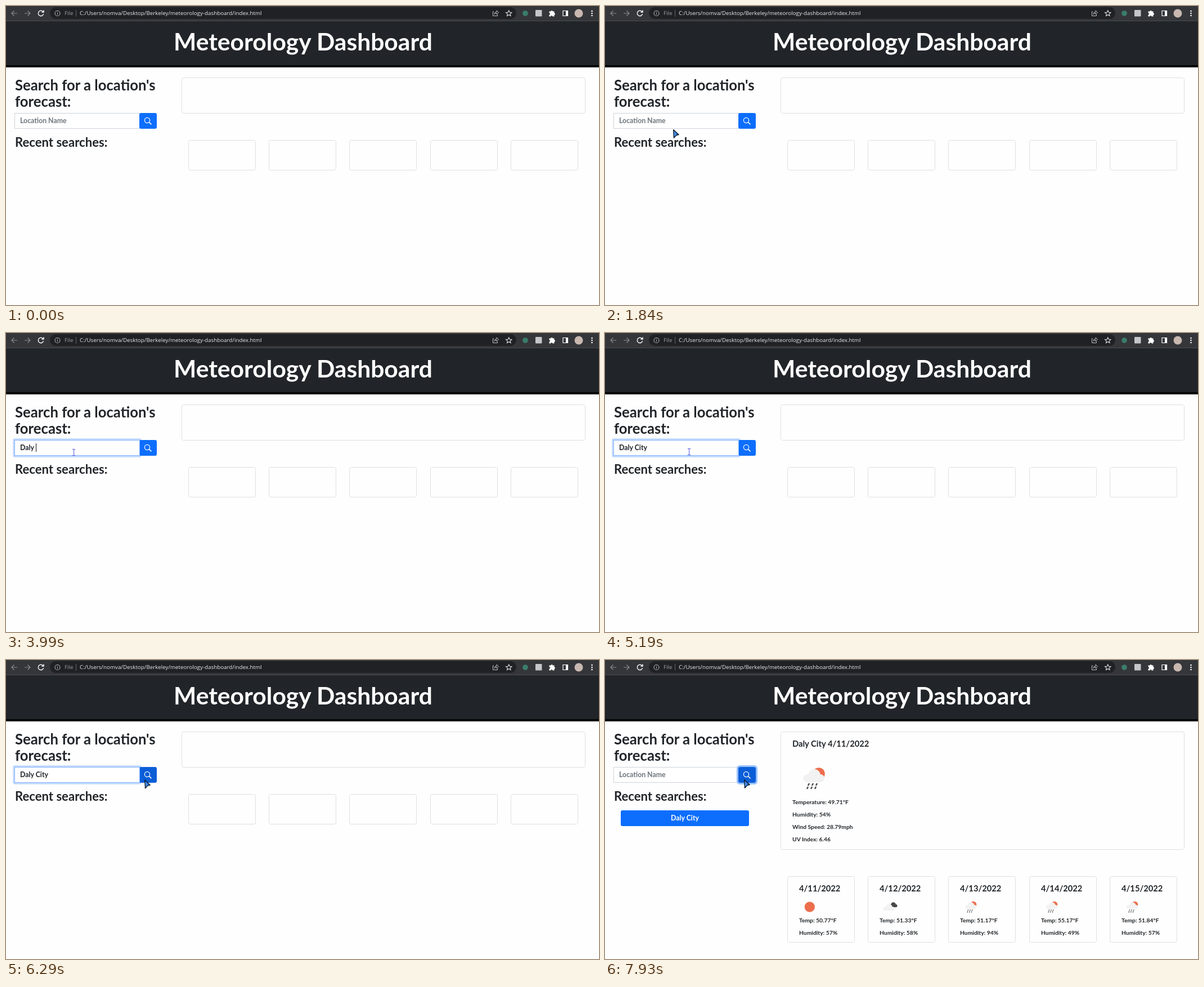
Recreate the animation shown at these times as an HTML page. Size 1054 by 531 pixels, loop 8 s.

```html
<!DOCTYPE html>
<html lang="en">
<head>
<meta charset="utf-8">
<title>Meteorology Dashboard</title>
<style>
html, body { margin: 0; width: 100%; height: 100%; overflow: hidden; background: #fefefe; }
svg { position: absolute; left: 0; top: 0; display: block; }
svg, #field { font-family: Lato, "Open Sans", sans-serif; font-weight: 700; }
text { fill: #212529; }
.title { font-size: 42.6px; fill: #fff; text-anchor: middle; }
.h2 { font-size: 25.7px; }
.h3 { font-size: 22.1px; }
.h5 { font-size: 14.7px; }
.input { font-size: 12.3px; }
.small { font-size: 10.3px; }
.url { font: 400 9.8px "Open Sans", "Noto Sans", sans-serif; fill: #e8eaed; }
.line { fill: none; stroke: #e0e1e3; stroke-width: 1.2; }
.card { fill: #fefefe; stroke: #dfdfdf; }

#field {
  position: absolute; left: 25px; top: 190px; height: 28px;
  line-height: 28px; font-size: 12.3px; color: #212529; white-space: pre;
}
#caret {
  display: inline-block; width: 1px; height: 15px; margin-left: .5px;
  vertical-align: -3px; background: #111;
}

/* One shared 8 s timeline */
.a { animation: 8s linear infinite; }
.step { animation-timing-function: step-end; }
#hint { animation-name: hint; }
#caret { animation-name: caret; }
#glow { animation-name: glow; }
#button { fill: #0d6efd; animation-name: hover; }
#ring { animation-name: ring; }
#recent { animation-name: recent; }
.result { animation-name: result; }
#main { animation-name: grow; }
#days { animation-name: drop; }
.day { animation-name: growDay; }
#cursor { animation-name: move; }
#arrow { animation-name: arrow; }
#beam { animation-name: beam; }

@keyframes hint { 0%, 80.625% { visibility: visible } 42.125% { visibility: hidden } 100% { visibility: visible } }
@keyframes caret {
  0%, 32.75%, 62.75%, 75.25%, 100% { opacity: 0 }
  26.5%, 39%, 69% { opacity: 1 }
}
@keyframes glow { 0%, 25.75%, 81.25%, 100% { opacity: 0 } 27.6%, 79.375% { opacity: 1 } }
@keyframes hover { 0%, 69.5% { fill: #0d6efd } 71.4%, 100% { fill: #0b5ed7 } }
@keyframes ring { 0%, 79.375% { opacity: 0 } 81.25%, 100% { opacity: 1 } }
@keyframes recent { 0% { visibility: hidden } 83.625%, 100% { visibility: visible } }
@keyframes result { 0% { visibility: hidden } 95%, 100% { visibility: visible } }
@keyframes grow { 0% { height: 63px } 95%, 100% { height: 209px } }
@keyframes growDay { 0% { height: 53px } 95%, 100% { height: 117px } }
@keyframes drop { 0% { transform: translateY(0) } 95%, 100% { transform: translateY(146px) } }
@keyframes move {
  0%, 10.75% { transform: translate(298px, 522px) }
  12% { transform: translate(249px, 459px) }
  13.375% { transform: translate(204px, 403px) }
  15.6% { transform: translate(160px, 308px) }
  18% { transform: translate(130px, 242px) }
  20.75%, 22% { transform: translate(121px, 223px) }
  23% { transform: translate(121px, 219px) }
  25%, 63.25% { transform: translate(120.5px, 212px) }
  67.5% { transform: translate(196px, 209px) }
  70.5% { transform: translate(239px, 211px) }
  72.25%, 73.5% { transform: translate(245px, 212px) }
  83%, 92.75% { transform: translate(247px, 213px) }
  99%, 100% { transform: translate(247px, 212px) }
}
@keyframes arrow {
  0%, 23.4% { visibility: hidden }
  10.75%, 69.9%, 100% { visibility: visible }
}
@keyframes beam { 0%, 69.9%, 100% { visibility: hidden } 23.4% { visibility: visible } }
</style>
</head>
<body>
<svg width="1054" height="531" viewBox="0 0 1054 531">
  <defs>
    <linearGradient id="blue" x2="1">
      <stop offset="0" stop-color="#58a6ff"/><stop offset="1" stop-color="#1456b8"/>
    </linearGradient>
    <g id="cloud">
      <circle cx="-12" cy="0" r="7"/><circle cx="1" cy="-5" r="11"/><circle cx="12" cy="0" r="7"/>
      <rect x="-12" y="-3" width="24" height="10"/>
    </g>
    <g id="rain">
      <circle cx="9" cy="-8" r="10.8" fill="#ec6e4c"/>
      <use href="#cloud" fill="#f2f2f2"/>
      <path d="M-8 9l-2 4M-1 9l-2 4M6 9l-2 4M-10 15l-2 4M-3 15l-2 4M4 15l-2 4" stroke="#48484a" stroke-width="2.4"/>
    </g>
    <g id="sun"><circle cx="-10" cy="0" r="17.6" fill="#ec6e4c"/></g>
    <g id="clouds">
      <use href="#cloud" fill="#48484a" transform="translate(10 -4) scale(.74)"/>
      <use href="#cloud" fill="#f2f2f2" transform="translate(-5 6)"/>
    </g>
  </defs>

  <!-- browser bar -->
  <rect width="1054" height="27" fill="#35363a"/>
  <rect x="78" y="2" width="829" height="21" rx="10.5" fill="#202124"/>
  <g class="line">
    <path d="M20 13H10m4.500-4.500L10 13l4.500 4.500M33 13h10m-4.500-4.500L43 13l-4.500 4.500" stroke="#8b8c8f"/>
    <path d="M66 10.500a4.700 4.700 0 1 0 .6 3.600M67 7.500v3.600h-3.600" stroke="#f1f3f4" stroke-width="1.500"/>
    <g stroke="#a4a8ad"><circle cx="91.500" cy="13" r="4.500"/><path d="M91.500 12.300v3M91.500 10.300v1"/></g>
    <path d="M124.500 7v12" stroke="#5f6368" stroke-width="1"/>
    <path d="M867 10h-1.500v7.500h8V15M868 14.500q.5-4 4-4V8l3.500 3.500-3.500 3.300v-2.300q-2.500 0-4 2z" stroke="#bdc1c6" stroke-width="1"/>
    <path d="M893.800 8l1.500 3.300 3.600.4-2.700 2.400.8 3.500-3.200-1.800-3.200 1.800.8-3.500-2.700-2.400 3.600-.4z" stroke="#d5d8dc"/>
    <path d="M990 8.500h8.500v9H990z" stroke="#fff"/>
  </g>
  <text class="url" x="104" y="16.300" style="fill:#9aa0a6">File</text>
  <text class="url" x="131" y="16.300">C:/Users/nomva/Desktop/Berkeley/meteorology-dashboard/index.html</text>
  <circle cx="923" cy="13" r="4.800" fill="#3a7d6b"/>
  <rect x="941" y="7" width="11.500" height="11.500" rx="1" fill="#c5c6c7"/>
  <g fill="#fff">
    <path d="M965.500 9.500h3a1.600 1.600 0 0 1 3.200 0h2.800v3a1.600 1.600 0 0 1 0 3.200v2.800h-3a1.600 1.600 0 0 0-3.200 0h-2.800v-3a1.600 1.600 0 0 0 0-3.200z"/>
    <path d="M995 8.500h3.500v9H995z"/>
    <circle cx="1041.500" cy="9" r="1.300"/><circle cx="1041.500" cy="13" r="1.300"/><circle cx="1041.500" cy="17" r="1.300"/>
  </g>
  <circle cx="1018" cy="13" r="7.500" fill="#c9b8b0"/>

  <!-- page header -->
  <rect y="26" width="1054" height="1" fill="#4b4c50"/>
  <rect y="27" width="1054" height="79" fill="#212529"/>
  <rect y="105" width="1054" height="4" fill="#000"/>
  <text class="title" x="528" y="79">Meteorology Dashboard</text>

  <!-- search column -->
  <text class="h2" x="16" y="150">Search for a location's</text>
  <text class="h2" x="16" y="179">forecast:</text>
  <rect x="15.500" y="190.500" width="222" height="27" fill="#fff" stroke="#ced4da"/>
  <rect id="ring" class="a" x="235.500" y="188.500" width="34" height="31" rx="4" fill="none" stroke="#98c1fe" stroke-width="3"/>
  <rect id="button" class="a" x="237" y="190" width="31" height="28" rx="3"/>
  <g fill="none" stroke="#fff" stroke-width="1.200" stroke-linecap="round">
    <circle cx="251" cy="203" r="4.600"/><path d="M254.500 206.500l3.500 3.300" stroke-width="1.600"/>
  </g>
  <g id="glow" class="a" fill="none">
    <rect x="15.500" y="190.500" width="222" height="27" stroke="#86b7fe"/>
    <rect x="13.700" y="188.700" width="225.600" height="30.600" rx="1.500" stroke="#0d6efd" stroke-opacity=".25" stroke-width="2.800"/>
  </g>
  <text id="hint" class="input a step" x="25" y="208" style="fill:#6c757d">Location Name</text>
  <text class="h3" x="16" y="250">Recent searches:</text>
  <g id="recent" class="a step">
    <rect x="28" y="267" width="228" height="28" rx="3" fill="#0d6efd"/>
    <text class="input" x="142" y="285" text-anchor="middle" style="fill:#fff">Daly City</text>
  </g>

  <!-- current weather -->
  <rect id="main" class="card a step" x="312.500" y="127.500" width="717" height="63" rx="3"/>
  <g class="result a step">
    <text class="h5" x="333" y="153.500">Daly City 4/11/2022</text>
    <use href="#rain" transform="translate(371 210)"/>
    <g class="small">
      <text x="333" y="256">Temperature: 49.71°F</text>
      <text x="333" y="278">Humidity: 54%</text>
      <text x="333" y="300">Wind Speed: 28.79mph</text>
      <text x="333" y="322">UV Index: 6.46</text>
    </g>
  </g>
  <g id="days" class="a step"></g>
</svg>

<div id="field"><span id="typed"></span><span id="caret" class="a step"></span></div>

<svg width="1054" height="531" viewBox="0 0 1054 531">
  <g id="cursor" class="a">
    <path id="arrow" class="a step" d="M.7 .8L10 9.500 5.600 10.600 1.500 15.300z" fill="url(#blue)" stroke="#0a1526" stroke-width="1.400" stroke-linejoin="round"/>
    <path id="beam" class="a step" d="M-2.500-5.500h2l.5.500.5-.5h2M0-5.500v11M-2.500 5.500h2l.5-.5.500.5h2" fill="none" stroke="#4343d6"/>
  </g>
</svg>

<script>
const LOOP = 8000, CLEARED = 6450, TEXT = "Daly City";
const KEYS = [3370, 3490, 3730, 3860, 3990, 4190, 4360, 4440, 4520];
const DAYS = [
  ["sun", "50.77", 57],
  ["clouds", "51.33", 58],
  ["rain", "51.17", 94],
  ["rain", "55.17", 49],
  ["rain", "51.84", 57]
];

document.getElementById("days").innerHTML = DAYS.map(([icon, temp, humidity], i) => {
  const x = Math.round(324 + 143.2 * i);
  return `<rect class="card day a step" x="${x + .5}" y="238.5" width="119" height="53" rx="3"/>
    <g class="result a step">
      <text class="h5" x="${x + 21}" y="265">4/${11 + i}/2022</text>
      <use href="#${icon}" transform="translate(${x + 40 + (icon === "sun" ? 5 : 0)} 292.5) scale(.52)"/>
      <text class="small" x="${x + 21}" y="320">Temp: ${temp}°F</text>
      <text class="small" x="${x + 21}" y="342">Humidity: ${humidity}%</text>
    </g>`;
}).join("");

const typed = document.getElementById("typed");
let start;
function tick(now) {
  start ??= now;
  const t = (now - start) % LOOP;
  const count = t < CLEARED ? KEYS.filter(k => k <= t).length : 0;
  typed.textContent = TEXT.slice(0, count);
  requestAnimationFrame(tick);
}
requestAnimationFrame(tick);
</script>
</body>
</html>
```
